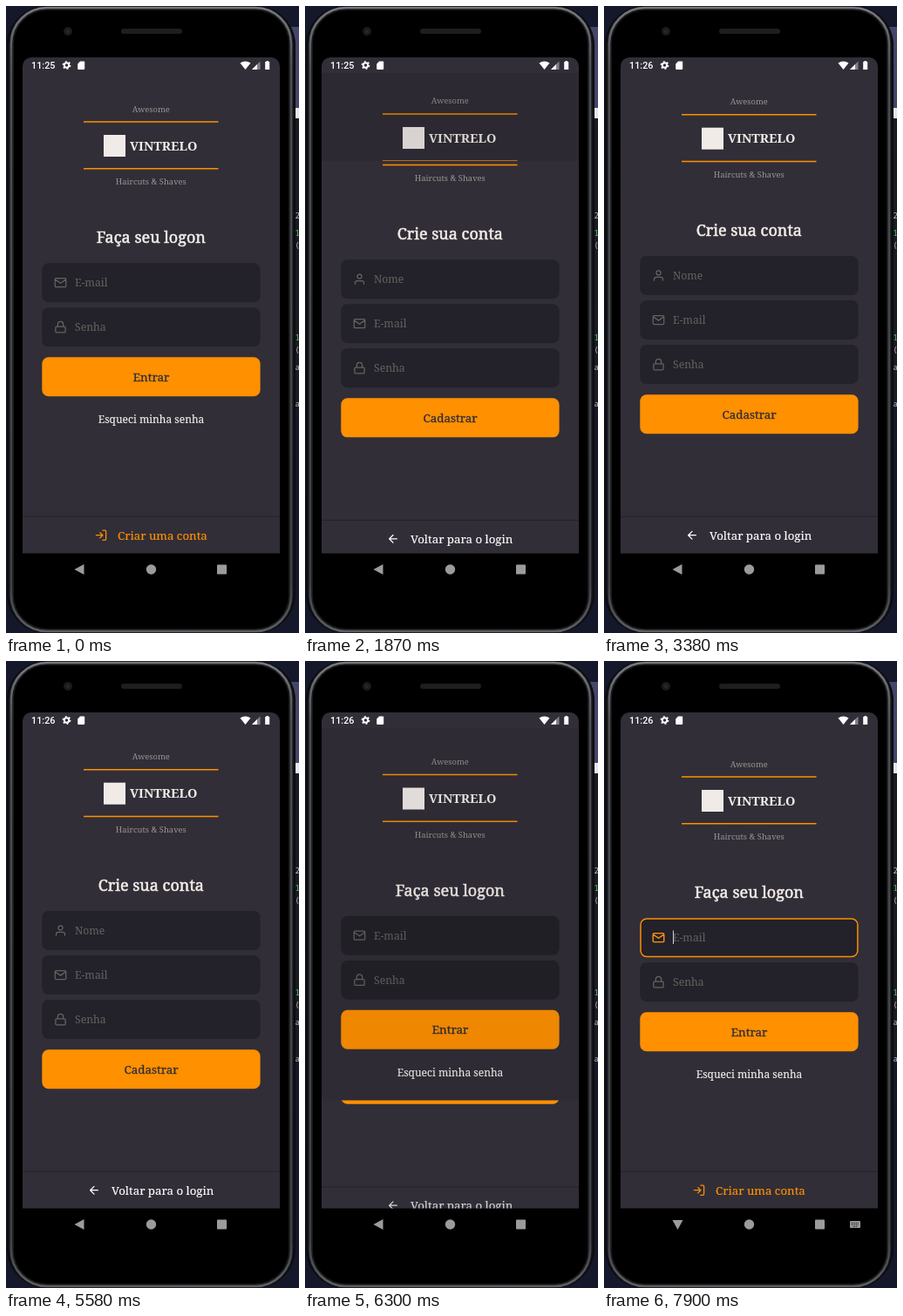
An HTML page for the animation above (8000 ms loop, 336 px wide and 720 px high).

```html
<!DOCTYPE html>
<html lang="pt-BR">
<head>
<meta charset="utf-8">
<title>Logon</title>
<style>
  html, body { margin: 0; width: 100%; height: 100%; overflow: hidden; background: #11131f; }
  svg { display: block; }
  #stage { width: 336px; height: 720px; }
  text { font-family: "Noto Serif", serif; fill: #f4ede8; }
  .mid { text-anchor: middle; }
  .title { font-size: 18px; stroke: #f4ede8; stroke-width: .55px; }
  .label { font-size: 13.4px; fill: #312e38; stroke: #312e38; stroke-width: .3px; }
  .link { font-size: 12px; stroke: #f4ede8; stroke-width: .15px; }
  .foot { font-size: 13.3px; stroke: currentColor; stroke-width: .15px; }
  .hint { font-size: 12.2px; fill: #666360; }
  .tag { font-size: 9.4px; fill: #999591; }
  .name { font-size: 14.5px; font-weight: 600; }
  .clock { font: 500 10.8px Roboto, sans-serif; fill: #fff; }
  .code text { font: 9px "Noto Sans Mono", monospace; fill: #b9bcc4; }
  .code .ok { fill: #59c46b; }
  .icon { fill: none; stroke: currentColor; stroke-width: 2; stroke-linecap: round; stroke-linejoin: round; }
</style>
</head>
<body>
<svg id="stage" viewBox="0 0 336 720">
  <defs>
    <symbol id="mail" viewBox="0 0 24 24"><path class="icon" d="M4 4h16a2 2 0 0 1 2 2v12a2 2 0 0 1-2 2H4a2 2 0 0 1-2-2V6a2 2 0 0 1 2-2zM22 6l-10 7L2 6"/></symbol>
    <symbol id="lock" viewBox="0 0 24 24"><path class="icon" d="M5 11h14a2 2 0 0 1 2 2v7a2 2 0 0 1-2 2H5a2 2 0 0 1-2-2v-7a2 2 0 0 1 2-2zM7 11V7a5 5 0 0 1 10 0v4"/></symbol>
    <symbol id="user" viewBox="0 0 24 24"><path class="icon" d="M20 21v-2a4 4 0 0 0-4-4H8a4 4 0 0 0-4 4v2"/><circle class="icon" cx="12" cy="7" r="4"/></symbol>
    <symbol id="enter" viewBox="0 0 24 24"><path class="icon" d="M15 3h4a2 2 0 0 1 2 2v14a2 2 0 0 1-2 2h-4M10 17l5-5-5-5M15 12H3"/></symbol>
    <symbol id="left" viewBox="0 0 24 24"><path class="icon" d="M19 12H5M12 19l-7-7 7-7"/></symbol>
    <clipPath id="app"><rect x="19" y="77" width="295" height="551.4"/></clipPath>
    <clipPath id="reveal"><rect id="window" x="19" y="77" width="295" height="551.4"/></clipPath>
    <linearGradient id="rim" x2="0" y2="1">
      <stop stop-color="#77797d"/><stop offset=".1" stop-color="#4c4e52"/>
      <stop offset=".92" stop-color="#3e4044"/><stop offset="1" stop-color="#5c5e62"/>
    </linearGradient>
  </defs>

  <!-- desktop behind the phone -->
  <rect width="336" height="720" fill="#15172b"/>
  <rect x="326" y="24" width="10" height="93" fill="#45446a"/>
  <rect x="326" y="117" width="10" height="12" fill="#e4e6ec"/>
  <rect x="326" y="129" width="10" height="331" fill="#1b1c22"/>
  <g class="code">
    <text x="331.5" y="244">2</text><text class="ok" x="331.5" y="264">1</text>
    <text x="331.5" y="278">(</text><text class="ok" x="331.5" y="384">1</text>
    <text x="331.5" y="398">(</text><text x="331.5" y="418">a</text><text x="331.5" y="460">a</text>
  </g>

  <!-- phone -->
  <rect x="1" y="0" width="331" height="720" rx="45" fill="#0c0d10"/>
  <rect x="3.500" y="1" width="326" height="718" rx="43" fill="#1d1e21"/>
  <rect x="6" y="2" width="321" height="716" rx="41" fill="#191a1c" stroke="url(#rim)" stroke-width="2.500"/>
  <rect x="9" y="5" width="315" height="710" rx="38" fill="#000"/>
  <circle cx="71" cy="29" r="5" fill="#1a1b1f"/><circle cx="71" cy="29" r="2.2" fill="#26282f"/>
  <rect x="132" y="26" width="70" height="6" rx="3" fill="#1e1e1f"/>
  <path d="M19 628.400V69a10 10 0 0 1 10-10h275a10 10 0 0 1 10 10v559.400z" fill="#312e38"/>

  <g clip-path="url(#app)">
    <g id="login"></g>
    <rect id="shade" x="19" y="77" width="295" height="551.4" opacity="0"/>
  </g>
  <g id="card" clip-path="url(#reveal)">
    <rect x="19" y="77" width="295" height="551.4" fill="#312e38"/>
    <g id="signup"></g>
  </g>

  <!-- status bar -->
  <text id="clock" class="clock" x="29" y="72">11:25</text>
  <g fill="#fff">
    <circle cx="69.5" cy="68" r="2.7" fill="none" stroke="#fff" stroke-width="2"/>
    <circle cx="69.5" cy="68" r="4.2" fill="none" stroke="#fff" stroke-width="1.4" stroke-dasharray="1.9 2.498"/>
    <path d="M85 63.5h4.2a1 1 0 0 1 1 1v7.500a1 1 0 0 1-1 1h-6a1 1 0 0 1-1-1v-5.500z"/>
    <path d="M268.500 65.500q6-4 12 0l-6 7.500z"/>
    <path d="M291.500 63.500v9.500h-9.500z" opacity=".4"/>
    <path d="M288 67v6h-6z"/>
    <path d="M298.500 63h2.500v1h1.200v9h-5v-9h1.300z"/>
  </g>

  <!-- navigation bar -->
  <g fill="#9b9b9b">
    <path id="back" d="M78.500 647l11-6v12z"/>
    <circle cx="166.500" cy="647" r="5.700"/>
    <rect x="242" y="641.500" width="11" height="11" rx=".8"/>
    <g id="keys" opacity="0">
      <rect x="282" y="643" width="12" height="8" rx="1"/>
      <path d="M283.500 645.300h9M283.500 647.300h9M285.500 649.500h5" stroke="#000" stroke-width=".9" stroke-dasharray="1 .8"/>
    </g>
  </g>
  <circle id="tap" fill="#606c7c" opacity="0"/>
</svg>

<script>
const $ = id => document.getElementById(id);
const set = (id, attrs) => { for (const k in attrs) $(id).setAttribute(k, attrs[k]); };

// Screen parts
const icon = (name, x, y, color) =>
  `<use href="#${name}" x="${x - 7.5}" y="${y - 7.5}" width="15" height="15" style="color:${color}"/>`;

const box = (y, fill) =>
  `<rect x="41.300" y="${y}" width="250.300" height="45" rx="7.500" fill="${fill}"/>`;

const field = (y, name, hint) =>
  `${box(y, '#232129')}
   ${icon(name, 62.5, y + 22.5, '#666360')}
   <text class="hint" x="79" y="${y + 26.8}">${hint}</text>`;

const button = (y, label) =>
  `${box(y, '#ff9000')}
   <text class="label mid" x="166.500" y="${y + 27.5}">${label}</text>`;

const header = (dy, title) =>
  `<g transform="translate(0 ${dy})">
     <text class="tag mid" x="166.300" y="121.500">Awesome</text>
     <path d="M89 133.100h154.500M89 186.700h154.500" stroke="#ff9000" stroke-width="1.500"/>
     <rect x="112" y="148" width="25" height="25" fill="#f0ebe7"/>
     <text class="name" x="142" y="165.700">VINTRELO</text>
     <text class="tag mid" x="166.300" y="205">Haircuts &amp; Shaves</text>
     <text class="title mid" x="166.300" y="272">${title}</text>
   </g>`;

const footer = (id, name, ix, tx, label, color) =>
  `<g id="${id}">
     <path d="M19 586.300h295" stroke="#232129"/>
     ${icon(name, ix, 607.7, color)}
     <text class="foot" x="${tx}" y="612.500" style="fill:${color};color:${color}">${label}</text>
   </g>`;

$('login').innerHTML = header(0, 'Faça seu logon')
  + field(295.2, 'mail', 'E-mail') + field(346.2, 'lock', 'Senha') + button(403.2, 'Entrar')
  + '<text class="link mid" x="166.500" y="479">Esqueci minha senha</text>'
  + footer('create', 'enter', 109, 128, 'Criar uma conta', '#ff9000')
  + `<g id="focus">
       <rect x="42" y="296" width="248.900" height="43.500" rx="7" fill="none" stroke="#ff9000" stroke-width="1.500"/>
       ${icon('mail', 62.5, 317.7, '#ff9000')}
       <rect id="caret" x="79" y="309.500" width="1" height="15.500" fill="#d8d3d0"/>
     </g>`;

$('signup').innerHTML = header(-8.3, 'Crie sua conta')
  + field(287, 'user', 'Nome') + field(338, 'mail', 'E-mail') + field(389, 'lock', 'Senha')
  + button(446.2, 'Cadastrar')
  + footer('return', 'left', 101, 121, 'Voltar para o login', '#fff');

// Timing
const LOOP = 8000, SLIDE = 425, HEIGHT = 551.4, TOP = 77;
const OPEN = 1740, CLOSE = 6125;

const ramp = (t, a, b) => Math.min(1, Math.max(0, (t - a) / (b - a)));
const inOut = x => x < .5 ? 2 * x * x : 1 - 2 * (1 - x) ** 2;
const cubic = (a, b, s) => 3 * a * s * (1 - s) ** 2 + 3 * b * s * s * (1 - s) + s ** 3;

function slide(x) {
  if (x <= 0 || x >= 1) return x <= 0 ? 0 : 1;
  let lo = 0, hi = 1;
  for (let i = 0; i < 24; i++) {
    const m = (lo + hi) / 2;
    if (cubic(.20833, .25, m) < x) lo = m; else hi = m;
  }
  return cubic(.82, 1, lo);
}

// The screen refreshes only at these moments
const every = (from, to, step) =>
  Array.from({ length: Math.floor((to - from) / step) + 1 }, (_, i) => from + i * step);
const ticks = [0, ...every(1050, 1600, 55), 1870, 1930, 2000, 2120, 2170,
  ...every(5580, 6240, 60), 6360, 6430, 6550, 7380, ...every(7450, 7900, 56.25)];
const held = t => ticks.filter(k => k <= t).pop();

const taps = [
  { x: 225, y: 607, on: 1050, off: 1400 },
  { x: 225, y: 607, on: 5630, off: 5960 },
  { x: 150, y: 329, on: 7380, off: 7450 }
];

function draw(now) {
  const t = held(now);

  const p = t < 1870 ? 0 : t < CLOSE ? slide((t - OPEN) / SLIDE) : 1 - slide((t - CLOSE) / SLIDE);
  const gap = HEIGHT * (1 - p);
  set('card', { visibility: p > 0 ? 'visible' : 'hidden' });
  set('window', { y: TOP + gap, height: HEIGHT - gap });
  set('signup', { transform: `translate(0 ${.041 * gap})` });
  set('login', { transform: `translate(0 ${-.02 * HEIGHT * p})` });
  set('shade', { opacity: .1 * ramp(p, 0, .36) });

  set('create', { opacity: t >= 2170 ? 1 : 1 - .8 * inOut(ramp(t, 1150, 1320)) });
  set('return', { opacity: 1 - .8 * inOut(ramp(t, 5690, 5860)) + .8 * inOut(ramp(t, 6080, 6330)) });

  const tap = taps.find(k => t >= k.on && t < k.off + 200);
  if (tap) {
    const out = ramp(t, tap.off, tap.off + 200);
    set('tap', { cx: tap.x, cy: tap.y, r: 9.3 + 3 * out, opacity: .5 * (1 - out) });
  } else set('tap', { opacity: 0 });

  set('focus', { visibility: t >= 7550 ? 'visible' : 'hidden' });
  set('back', { transform: `rotate(${-90 * inOut(ramp(t, 7600, 7800))} 84.500 647)` });
  set('keys', { opacity: ramp(t, 7600, 7800) });
  $('clock').textContent = now < 3380 ? '11:25' : '11:26';
}

const start = performance.now();
function frame() {
  draw((performance.now() - start) % LOOP);
  requestAnimationFrame(frame);
}
frame();
</script>
</body>
</html>
```
